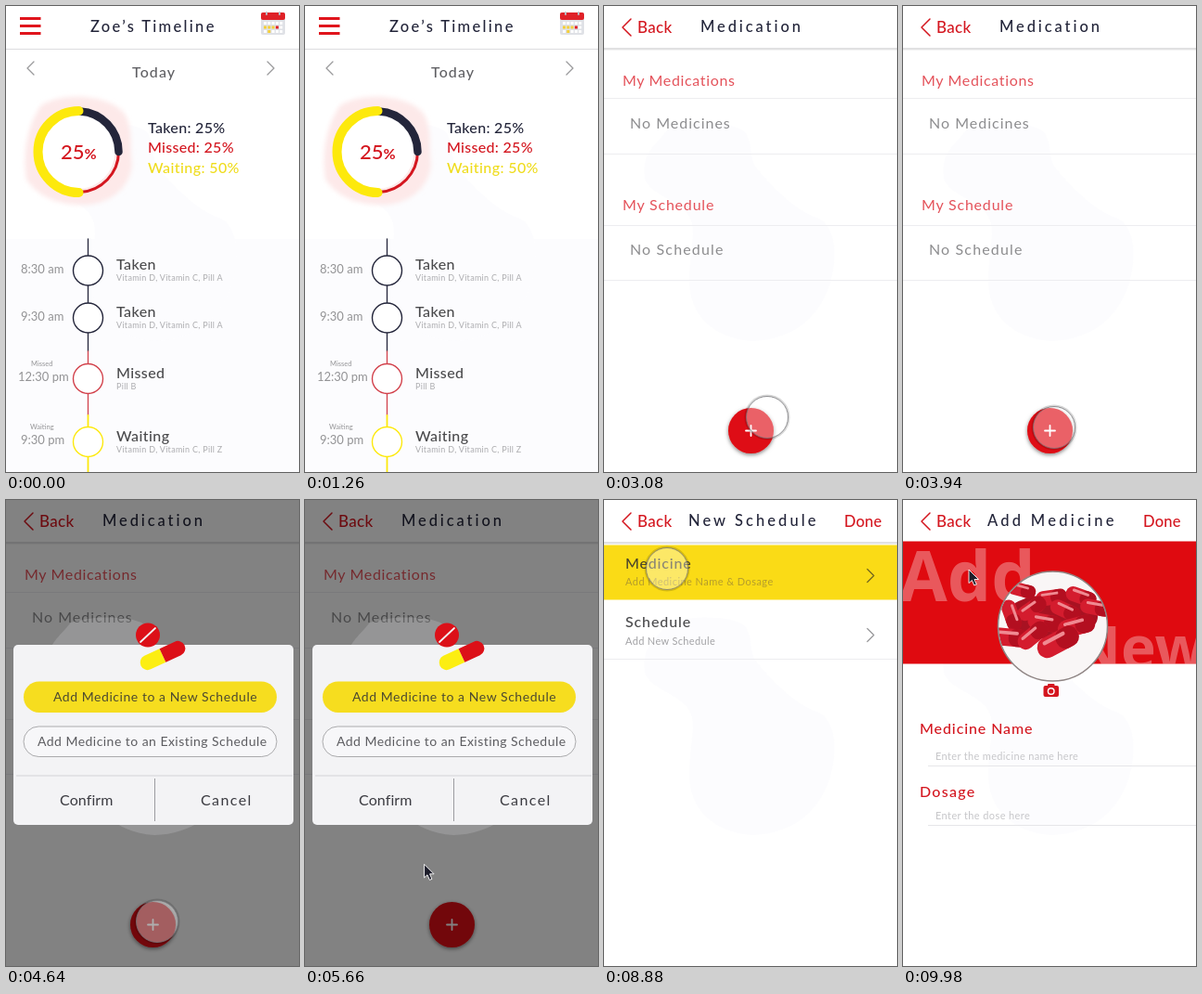
Recreate the animation shown at these times as an HTML page. Size 316x502 px, loop 10 s.

```html
<!DOCTYPE html>
<html lang="en">
<head>
<meta charset="utf-8">
<title>Medication reminder</title>
<style>
html, body { margin: 0; width: 100%; height: 100%; overflow: hidden; background: #fff; }
svg { display: block; width: 316px; height: 502px; font-family: Lato, sans-serif; }
text { white-space: pre; }
.line { fill: none; stroke-linecap: round; stroke-linejoin: round; }
</style>
</head>
<body>
<svg id="stage" viewBox="0 0 316 502"></svg>
<script>
const LOOP = 10000;
const INK = '#23253a', RED = '#d4161f', YELLOW = '#fde90c', GREY = '#8c8c8e', DARK = '#4a4a4c';
const MEDIUM = 'font-weight="500"';

const text = (x, y, size, str, color, spacing = 0, extra = '') =>
  `<text x="${x}" y="${y}" font-size="${size}" fill="${color}" letter-spacing="${spacing}" ${extra}>${str}</text>`;
const rect = (x, y, w, h, fill, extra = '') =>
  `<rect x="${x}" y="${y}" width="${w}" height="${h}" fill="${fill}" ${extra}/>`;
const circle = (x, y, r, fill, extra = '') =>
  `<circle cx="${x}" cy="${y}" r="${r}" fill="${fill}" ${extra}/>`;
const path = (d, color, width = 1, extra = '') =>
  `<path class="line" d="${d}" stroke="${color}" stroke-width="${width}" ${extra}/>`;
const rule = (y, color = '#ededf0', x = 0) => rect(x, y, 316 - x, 1, color);
const chevron = (x, y, w, h, color, width) => path(`M${x - w},${y - h}L${x},${y}L${x - w},${y + h}`, color, width);
const scene = (id, ...parts) => `<g id="${id}">${parts.join('')}</g>`;

const blob = fill => `<path fill="${fill}" d="M70 132C95 124 140 124 152 136C162 150 155 162 165 175
  C185 200 210 222 232 229C252 240 251 275 244 298C232 338 200 360 160 361C115 358 92 330 92 296
  C92 270 98 250 95 234C90 210 48 205 44 185C40 160 55 150 70 132Z"/>`;
const BLOB = blob('#fcfcfe');

const header = (title, x, spacing, done) =>
  rect(0, 45, 316, 3, '#f3f3f3') + rule(45.5, '#cfcfd2') +
  text(x, 28, 16.5, title, INK, spacing, MEDIUM) +
  chevron(20, 23, -9, 9, RED, 1.5) + text(36, 29, 17, 'Back', RED, .3, MEDIUM) +
  (done ? text(259, 29, 16.5, 'Done', RED, .2, MEDIUM) : '');

// Timeline
const ROSE = '#d2414b';
const entry = (y, time, tx, title, note, color, label = '', lx = 0) =>
  circle(88.5, y, 16, '#fff', `stroke="${color}" stroke-width="1.4"`) +
  text(tx, y + 2.5, 13, time, '#939395') + text(lx, y - 13.5, 7.5, label, '#939395') +
  text(119, y - 1, 16, title, DARK, .4, MEDIUM) + text(119, y + 11, 9, note, '#acacaf', .3);

const calendar = rect(275, 7, 26, 24, '#dfe1e6', 'rx="2"') + rect(275, 7, 26, 8, '#df2027', 'rx="2"') +
  [281, 295].map(x => rect(x - 1, 6, 2, 4, '#b9bcc4', 'rx="1"')).join('') +
  Array.from({ length: 15 }, (_, i) => rect(278 + i % 5 * 4.3, 17 + (i / 5 | 0) * 4.5, 3, 3,
    i === 8 ? '#df2027' : i > 4 && i < 8 || i === 11 ? '#f4cf3a' : '#fff')).join('');

const timeline = scene('timeline',
  rect(0, 251, 316, 251, '#fcfcfe'), BLOB,
  rect(0, 46, 316, 1, '#dcdcdf'),
  [13.5, 21.5, 29.5].map(y => rect(15, y - 1.5, 22.5, 3, '#e0141c')).join(''),
  text(91, 28, 16.5, 'Zoe’s Timeline', INK, 2.3, MEDIUM), calendar,
  chevron(23, 67, -7, 7, '#9a9a9c', 1.3), chevron(289, 67, 7, 7, '#9a9a9c', 1.3),
  text(136, 77, 16, 'Today', '#606064', 1.1, MEDIUM),
  `<path fill="#fde9e9" filter="url(#soft)" d="M38 107C60 92 112 95 128 116C138 135 133 150 136 170
    C134 200 105 216 80 214C55 214 35 205 22 187C18 160 22 130 38 107Z"/>`,
  circle(77.5, 157, 40, '#fff'),
  path('M121.5 157A44 44 0 0 1 80 200.5', RED, 3),
  path('M80 113.5A44 44 0 0 1 121.5 157', INK, 8.5),
  path('M78.5 113A44 44 0 0 0 78.5 201', YELLOW, 10),
  text(59, 164.5, 22, '25<tspan font-size="16" font-weight="700">%</tspan>', RED, 0, MEDIUM),
  text(153, 137, 16, 'Taken: 25%', INK, .3, MEDIUM),
  text(153, 158, 16, 'Missed: 25%', RED, .3, MEDIUM),
  text(153, 180, 16, 'Waiting: 50%', '#efdc1c', .4, MEDIUM),
  path('M88.5 251V372', INK, 1.3), path('M88.5 372V441', ROSE, 1.3), path('M88.5 441V503', YELLOW, 1.8),
  entry(285, '8:30 am', 16, 'Taken', 'Vitamin D, Vitamin C, Pill A', INK),
  entry(336, '9:30 am', 16, 'Taken', 'Vitamin D, Vitamin C, Pill A', INK),
  entry(401.5, '12:30 pm', 13, 'Missed', 'Pill B', ROSE, 'Missed', 27),
  entry(469.5, '9:30 pm', 16, 'Waiting', 'Vitamin D, Vitamin C, Pill Z', YELLOW, 'Waiting', 26));

// Medication list with the add button
const medication = scene('medication',
  BLOB, header('Medication', 104, 2.9),
  [99, 159, 236, 295].map(y => rule(y)).join(''),
  text(20, 86, 16, 'My Medications', '#e4525a', .65), text(28, 132, 16, 'No Medicines', GREY, 1),
  text(20, 220, 16, 'My Schedule', '#e4525a', .8), text(28, 268, 16, 'No Schedule', GREY, 1.15),
  circle(158.5, 457.5, 24.5, '#de0a12', 'filter="url(#shadow)"'),
  path('M153 457.5H164M158.5 452V463', '#fff', 1.8));

const dialog = scene('dialog',
  rect(0, 0, 316, 502, '#000', 'opacity=".49"'), blob('rgba(255,255,255,.16)'),
  rect(8, 156, 302, 194, '#f3f3f5', 'rx="5"'),
  circle(153, 145.5, 13, '#dc1018'), path('M145 153L161 138', '#f3f3f5', 1.8),
  `<g transform="translate(169 167.5) rotate(-25)">
    <path fill="#fcee12" d="M0 -8H-18A8 8 0 0 0 -18 8H0Z"/><path fill="#dc1018" d="M0 -8H18A8 8 0 0 1 18 8H0Z"/></g>`,
  rect(19, 195.5, 273, 33.5, '#f6dd1f', 'rx="16.7"'),
  text(51, 217, 14, 'Add Medicine to a New Schedule', '#4c4930', .55),
  rect(19, 244, 273, 32.5, '#f7f7f9', 'rx="16.2" stroke="#ababad"'),
  text(34, 265, 14, 'Add Medicine to an Existing Schedule', '#5c5c60', .46),
  rect(11, 296.5, 298, 1, '#d4d4d8'), rect(160, 300, 1, 46, '#9c9ca0'),
  text(58, 329, 16, 'Confirm', '#3c3c42', .1), text(210, 329, 16, 'Cancel', '#3c3c42', 1.4));

// New schedule
const schedule = scene('schedule',
  BLOB, header('New Schedule', 91, 3.05, true),
  rect(0, 48.5, 316, 59, '#fadb16'), rule(171),
  text(23, 74, 16, 'Medicine', '#4b452b', .8, MEDIUM),
  text(23, 92, 11, 'Add Medicine Name &amp; Dosage', '#b49c2c', .45),
  text(23, 137, 16, 'Schedule', DARK, .9, MEDIUM),
  text(23, 156, 11, 'Add New Schedule', '#a2a2a5', .35),
  chevron(291, 81.5, 7, 7, '#75691f', 1.3), chevron(291, 145.5, 7, 7, '#9a9a9c', 1.3));

// Add medicine
const capsule = ([x, y, angle, size]) => `<g transform="translate(${x} ${y}) rotate(${angle}) scale(${size})">
  ${rect(-17, -8, 34, 16, '#d41c2e', 'rx="8"')}${rect(-1, -8, 18, 16, '#b30f20', 'rx="7"')}
  ${rect(-11, -5.5, 19, 3, '#f08a92', 'rx="1.5"')}</g>`;
const capsules = [
  [128, 97, 15, .9], [160, 105, -8, 1], [192, 104, 20, 1], [139, 117, -35, 1], [208, 116, 10, 1],
  [175, 119, 25, 1], [117, 124, 70, 1], [153, 132, 10, 1.1], [187, 136, -15, 1.2], [115, 148, 5, 1.2],
  [140, 146, -40, 1.1], [167, 153, -28, 1.4]];

const details = scene('details',
  BLOB, header('Add Medicine', 91, 3.25, true),
  rect(0, 44.5, 316, 132, '#df0a10'),
  `<g clip-path="url(#band)" font-family="'Open Sans', sans-serif" font-weight="700" opacity=".32">
    ${text(-4, 109, 75, 'Add', '#fff')}${text(183, 182, 64, 'New', '#fff')}</g>`,
  circle(161.5, 136, 59, '#f9f6f6'),
  `<g clip-path="url(#photo)"><ellipse cx="160" cy="126" rx="50" ry="24" fill="#a81222"/>${capsules.map(capsule).join('')}</g>`,
  circle(161.5, 136, 59, 'none', 'stroke="#8f8584" stroke-width="1.5"'),
  rect(151.5, 200, 16.5, 12, RED, 'rx="2"'), rect(156, 198, 7.5, 4, RED, 'rx="1"'),
  circle(159.7, 206, 3.3, RED, 'stroke="#fff" stroke-width="1.4"'),
  text(18, 252, 16, 'Medicine Name', RED, .9, MEDIUM),
  text(35, 280, 11, 'Enter the medicine name here', '#c6c6c9', .35), rule(286, '#e6e6e9', 27),
  text(18, 320, 16, 'Dosage', RED, 1.3, MEDIUM),
  text(35, 344, 11, 'Enter the dose here', '#c6c6c9', .4), rule(350, '#e6e6e9', 27));

const stage = document.getElementById('stage');
stage.innerHTML = `<defs>
  <filter id="shadow" x="-30%" y="-30%" width="160%" height="160%">
    <feDropShadow dx="0" dy="1.5" stdDeviation="2" flood-opacity=".5"/></filter>
  <filter id="soft"><feGaussianBlur stdDeviation="2.5"/></filter>
  <clipPath id="band">${rect(0, 44.5, 316, 132, '#000')}</clipPath>
  <clipPath id="photo">${circle(161.5, 136, 58.5, '#000')}</clipPath></defs>` +
  timeline + medication + dialog + schedule + details +
  `<g id="touch">${circle(0, 0, 23.5, 'none', 'stroke="#000" stroke-width="2" opacity=".15"')}
    ${circle(0, 0, 22.5, 'rgba(255,255,255,.35)', 'stroke="#77777a" stroke-width=".8"')}</g>
  <path id="arrow" d="M0 0V14.5L3.4 11.5L5.8 17L8.3 16L6 10.5H10.5Z" fill="#1d1d2b" stroke="#fff" stroke-width=".9"/>`;

const el = id => document.getElementById(id);
const shown = { // visible from, to
  timeline: [0, 1640], medication: [1640, 6740], dialog: [4480, 6740], schedule: [6740, 9300], details: [9300, LOOP]
};
const pointer = [ // time, x, y
  [2240, 188, 528], [3000, 176, 443], [3150, 176, 443], [3700, 163, 454], [5200, 163, 454],
  [6150, 91, 325], [7300, 91, 325], [8500, 68, 74], [9000, 68, 74], [9300, 71, 75], [LOOP, 71, 75]];
const presses = [[2100, 5100], [6250, 6700], [8640, 9100]];

const clamp = v => Math.max(0, Math.min(1, v));
const smooth = p => p * p * (3 - 2 * p);

function pointerAt(t) {
  const i = Math.max(1, pointer.findIndex(k => k[0] >= t));
  const [t0, x0, y0] = pointer[i - 1], [t1, x1, y1] = pointer[i];
  const p = smooth(clamp((t - t0) / (t1 - t0)));
  return [x0 + (x1 - x0) * p, y0 + (y1 - y0) * p];
}

function draw(t) {
  for (const id in shown) {
    const [from, to] = shown[id];
    el(id).style.display = t >= from && t < to ? '' : 'none';
  }
  const place = `translate(${pointerAt(t)})`;
  const press = Math.max(...presses.map(([a, b]) => clamp(Math.min(t - a, b - t) / 120)));
  el('touch').setAttribute('transform', place);
  el('touch').setAttribute('opacity', press);
  el('arrow').setAttribute('transform', place);
  el('arrow').setAttribute('opacity', t > 5000 && press === 0 ? 1 : 0);
}

const start = performance.now();
function tick() {
  draw((performance.now() - start) % LOOP);
  requestAnimationFrame(tick);
}
tick();
</script>
</body>
</html>
```
